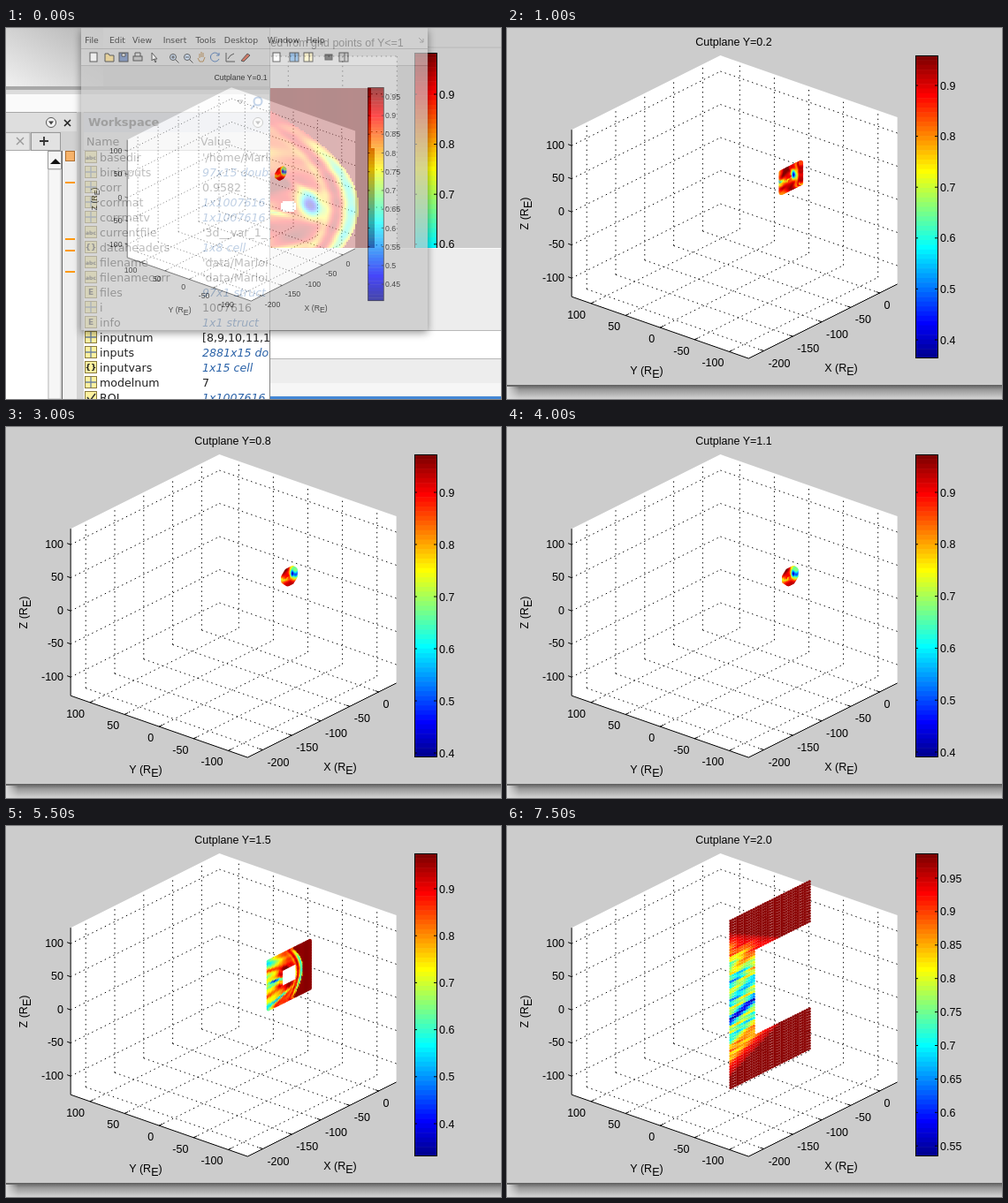
Animation of 560x420 px, one loop 8 s. Source, as an HTML page with a canvas:

```html
<!DOCTYPE html>
<html lang="en">
<head>
<meta charset="utf-8">
<title>Cutplane slices</title>
<style>
html, body { margin: 0; width: 100%; height: 100%; overflow: hidden; background: #ccc; }
#stage { position: absolute; left: 0; top: 0; width: 560px; height: 420px; overflow: hidden; }
#stage > * { position: absolute; left: 0; top: 0; }
text { font: 12.5px "Liberation Sans", Arial, sans-serif; fill: #000; white-space: pre; }
.ui text { font: 12.6px "DejaVu Sans", sans-serif; fill: #222; }
.ui .small { font-size: 9.3px; }
.ui .head { font-size: 13px; font-weight: bold; fill: #444; }
.ui .blue { fill: #2a62a8; font-style: italic; }
.dots { stroke: #000; stroke-width: 1; stroke-dasharray: 1.4 4; fill: none; }
.axis { stroke: #000; stroke-width: 1; fill: none; }
</style>
</head>
<body>
<div id="stage">
  <svg id="back" width="560" height="420"></svg>
  <canvas id="heat" width="560" height="420"></canvas>
  <svg id="front" width="560" height="420"></svg>
</div>
<script>
const LOOP = 8000;
const $ = id => document.getElementById(id);
const clamp = (v, a = 0, b = 1) => Math.min(b, Math.max(a, v));

const jetRgb = v => [3, 2, 1].map(k => Math.round(255 * clamp(1.5 - Math.abs(4 * v - k))));
const jet = v => `rgb(${jetRgb(clamp(v, 0.02, 1))})`;

// --- SVG helpers ---
const rect = (x, y, w, h, fill, more = "") =>
  `<rect x="${x}" y="${y}" width="${w}" height="${h}" fill="${fill}" ${more}/>`;
const line = (p, q, cls = "axis", more = "") =>
  `<line x1="${p[0]}" y1="${p[1]}" x2="${q[0]}" y2="${q[1]}" class="${cls}" ${more}/>`;
const path = (d, stroke, more = "") => `<path d="${d}" stroke="${stroke}" fill="none" ${more}/>`;
const label = (x, y, s, anchor = "start", more = "") =>
  `<text x="${x}" y="${y}" text-anchor="${anchor}" ${more}>${s}</text>`;
const axisName = c => `${c} (R<tspan dy="4">E</tspan><tspan dy="-4">)</tspan>`;
const range = (n, f) => Array.from({ length: n }, (_, i) => f(i)).join("");

// --- correlation field, in pixels of the flat plot ---
// centre x, centre y, length, width, slope, strength
const streaks = [
  [208, 132, 72, 11, 0.1, -0.3], [235, 159, 95, 6, 0.16, 0.2],
  [165, 183, 62, 7, -0.2, -0.2], [290, 181, 30, 11, -0.25, 0.24],
  [252, 199, 32, 4, 0.03, -0.66], [343, 199, 13, 13, 0.3, -0.85],
  [228, 210, 40, 4, 0, -0.25], [275, 222, 30, 6, 0.1, 0.2],
  [205, 238, 75, 7, -0.12, 0.18], [280, 258, 50, 4.5, -0.22, -0.5],
  [185, 271, 55, 8, -0.1, -0.27], [235, 284, 75, 6, -0.32, 0.16],
  [160, 294, 55, 13, -0.15, -0.3], [322, 236, 28, 9, -0.25, 0.16],
  [303, 208, 18, 3, 0.2, -0.3], [310, 200, 40, 34, 0, 0.14],
  [330, 178, 14, 5, 0.6, -0.18], [175, 325, 60, 7, 0.05, 0.12]
];

function field(x, y) {
  const dy = y - 202, depth = 398 - dy * dy / 119 - x;
  if (depth < 0) return 0.988 + 0.005 * Math.sin(x / 8);
  let v = 0.92 - 0.11 * clamp(depth / 35) - 0.18 * clamp((depth - 55) / 85);
  v -= 0.5 * Math.exp(-(((depth - 8) / 9) ** 2) - (dy / 74) ** 4);
  v += 0.1 * Math.exp(-(((depth - 24) / 6) ** 2) - (dy / 95) ** 4);
  v -= 0.12 * Math.exp(-(((depth - 36) / 5) ** 2) - (dy / 70) ** 4);
  for (const [cx, cy, sx, sy, slope, amp] of streaks) {
    const u = (x - cx) / sx, w = (y - cy - slope * (x - cx)) / sy;
    v += amp * Math.exp(-u * u - w * w);
  }
  return v + 0.018 * Math.sin(y / 4 + x / 40) + 0.012 * Math.sin(y / 2.3 - x / 25);
}

function paintHeat() {
  const g = $("heat").getContext("2d");
  for (let y = 68; y < 337; y += 2)
    for (let x = 125; x < (Math.abs(y - 202) < 67 ? 416 : 413); x += 2) {
      g.fillStyle = jet(field(x, y));
      g.fillRect(x, y, 2, Math.min(2, 337 - y));
    }
  g.fillStyle = "#fff";
  g.fillRect(313, 196, 13, 12);
  g.fillRect(311, 198, 17, 8);
}

// --- colour bar: ticks start at value v0 at height y0 ---
function colorBar(top, v0, y0, gap, step, n) {
  return range(64, i => rect(462, (top + i * 343 / 64).toFixed(2), 25.5, i < 63 ? 5.9 : 5.3, jet(1 - i / 64))) +
    rect(462.5, top + 0.5, 25, 342, "none", 'stroke="#000"') +
    range(n, i => {
      const y = y0 + i * gap;
      return line([484, y], [487.5, y]) + line([462, y], [465, y]) +
        label(490, y + 4.5, +(v0 - i * step).toFixed(2));
    });
}

const windowEdge =
  `<defs><linearGradient id="shade" x2="0" y2="1"><stop offset="0" stop-color="#5c5c5c"/>
   <stop offset=".35" stop-color="#999"/><stop offset="1" stop-color="#d4d4d4"/></linearGradient>
   <linearGradient id="corner"><stop offset="0" stop-color="#ddd"/>
   <stop offset="1" stop-color="#ddd" stop-opacity="0"/></linearGradient></defs>` +
  rect(0, 404, 560, 16, "url(#shade)") + rect(0, 406, 14, 14, "url(#corner)");

// --- flat plot ---
function flatPlot() {
  const ticks = [-80, -60, -40, -20, 0, 20, 40, 60, 80];
  const px = v => 319.3 + v * 3.075, py = v => 203 - v * 2.1375;
  return rect(0, 0, 560, 420, "#ccc") + rect(73, 32, 369.5, 342, "#fff") +
    ticks.map(v => {
      const x = px(v), y = py(v);
      return line([73, y], [442, y], "dots") + line([73, y], [77, y]) +
        label(69, y + 4.5, v, "end") + (v > 40 ? "" :
        line([x, 32], [x, 374], "dots") + line([x, 374], [x, 370]) + label(x, 391, v, "middle"));
    }).join("") +
    path("M73.5 32V374H442", "#000") +
    label(256, 21, "Correlations on the Y=0 cutplane interpolated from grid points of Y&lt;=1", "middle") +
    label(258, 405, axisName("X"), "middle") +
    label(0, 0, axisName("Z"), "middle", 'transform="translate(36 204) rotate(-90)" style="font-size:13.5px"') +
    colorBar(28, 0.9, 75, 56.6, 0.1, 6);
}

// --- 3D box ---
const project = (X, Y, Z) => [321.5 + 0.656 * X - 0.782 * Y, 169 - 0.328 * X - 0.273 * Y - 0.75 * Z];
const LO = { X: -226, Y: -128, Z: -128 }, HI = { X: 30.5, Y: 128, Z: 124 };

function box() {
  const P = project;
  const near = LO.X, far = HI.X, left = HI.Y, right = LO.Y, floor = LO.Z, roof = HI.Z;
  const hull = [P(near, left, roof), P(far, left, roof), P(far, right, roof),
    P(far, right, floor), P(near, right, floor), P(near, left, floor)];
  let s = `<polygon points="${hull.join(" ")}" fill="#fff"/>`;
  for (const X of [-200, -150, -100, -50, 0]) {
    const e = P(X, right, floor);
    s += line(P(X, left, floor), P(X, left, roof), "dots") + line(e, P(X, left, floor), "dots") +
      line(e, P(X, right + 5, floor)) + label(e[0] + 5, e[1] + 18, X);
  }
  for (const Y of [100, 50, 0, -50, -100]) {
    const e = P(near, Y, floor);
    s += line(P(far, Y, floor), P(far, Y, roof), "dots") + line(e, P(far, Y, floor), "dots") +
      line(e, P(near + 6, Y, floor)) + label(e[0] - 6, e[1] + 17, Y, "end");
  }
  for (const Z of [100, 50, 0, -50, -100]) {
    const e = P(near, left, Z), c = P(far, left, Z);
    s += line(e, c, "dots") + line(c, P(far, right, Z), "dots") +
      line(e, [e[0] - 4, e[1] - 1.5]) + label(65, e[1] + 3.5, Z, "end");
  }
  s += path("M" + [hull[0], hull[5], hull[4], hull[3]].join("L"), "#000");
  return s + label(378, 389, axisName("X"), "middle") + label(158, 392, axisName("Y"), "middle") +
    label(0, 0, axisName("Z"), "middle", 'transform="translate(24 210) rotate(-90)"');
}

// --- dotted slices ---
const inner = (X, Z) => field(319 + X * 3.07, 202 - Z * 2.1375);
function tail(X, Z) {
  const gap = 108 - 0.5 * (X + 105) - Math.abs(Z);
  if (gap < 0) return 0.99;
  const calm = clamp(gap / 55);
  return Math.max(0.45, 0.95 - gap * 0.008) +
    calm * (0.14 * Math.sin(Z * 0.22 - X * 0.1) + 0.08 * Math.sin(Z * 0.7)) -
    0.25 * Math.exp(-(((Z + 18 - (X + 85) * 0.3) / 6) ** 2));
}
const slices = {
  ball: { x: 11, z: 11, step: 1.5, r: 2.4, value: inner,
    has: (X, Z) => {
      const a = Math.abs(X), b = Math.abs(Z);
      return Math.max(a, b, (a + b) / 1.4) < 11.2 && Math.hypot(X, Z) > 3;
    } },
  plate: { x: 17, z: 16, step: 1.7, r: 2.6, value: inner,
    has: (X, Z) => Math.hypot(X, Z) > 4.5 },
  frame: { x: 36, z: 36, step: 2, r: 2, value: inner,
    has: (X, Z) => Math.max(Math.abs(X), Math.abs(Z)) > 12 },
  shell: { x0: -102, x: 36, z: 126, step: 4, r: 1.65, value: tail,
    has: (X, Z) => X < -60 || Math.abs(Z) > 62 }
};

function slice(kind, Y) {
  const { x, x0 = -x, z, step, r, value, has } = slices[kind];
  let s = "";
  for (let X = x0; X <= x + 0.01; X += step)
    for (let Z = -z; Z <= z + 0.01; Z += step) {
      if (!has(X, Z)) continue;
      const [cx, cy] = project(X, Y, Z);
      s += `<circle cx="${cx.toFixed(1)}" cy="${cy.toFixed(1)}" r="${r}" fill="${jet(value(X, Z))}"/>`;
    }
  return s;
}

const cutplane = ([, Y, kind, ...bar]) =>
  box() + slice(kind, Y) + label(256.5, 20, `Cutplane Y=${Y.toFixed(1)}`, "middle") + colorBar(31, ...bar);

// --- desktop behind the first figure ---
const vars = `basedir|'/home/Marlo
bininputs|97x15 double
corr|0.9582
corrmat|1x1007616
corrmatv|1x1007616
currentfile|'3d__var_1_
dataheaders|1x8 cell
filename|'data/Marloi
filenamecorr|'data/Marloi
files|97x1 struct
i|1007616
info|1x1 struct
inputnum|[8,9,10,11,1
inputs|2881x15 double
inputvars|1x15 cell
modelnum|7
ROI|1x1007616`.split("\n").map(r => r.split("|"));

function varIcon(name, value, y) {
  const mark = /cell/.test(value) ? "{}" : /^'/.test(value) ? "abc" : /struct/.test(value) ? "E" : "";
  return rect(89.5, y - 6.5, 13, 13, "#fdf2a0", 'stroke="#8a7a3c"') +
    (name === "ROI" ? path(`M92 ${y}l3 4l6 -8`, "#333", 'stroke-width="1.5"') :
     mark ? label(96, y + 3, mark, "middle", `style="font-size:${mark === "abc" ? 6 : 9}px;font-weight:bold"`) :
     path(`M96 ${y - 6}v12M90 ${y}h12`, "#6a80a0", 'stroke-width="1.3"'));
}

const dropIcon = (x, y) =>
  `<circle cx="${x}" cy="${y}" r="5.5" fill="#f4f4f4" stroke="#555"/><path d="M${x - 3} ${y - 1.5}h6l-3 4z" fill="#444"/>`;

function desktop() {
  const left = `<defs><linearGradient id="bar" x1="0" y1="1" x2="1" y2="0"><stop offset="0" stop-color="#f0f0f0"/>
    <stop offset="1" stop-color="#b4b4b4"/></linearGradient></defs>` +
    rect(0, 0, 299, 420, "#dedede") + rect(0, 0, 110, 66, "url(#bar)") + rect(110, 0, 189, 66, "#c4c4c4") +
    rect(0, 66, 299, 4, "#a8a8a8") + rect(0, 70, 299, 5, "#dcdcdc") +
    rect(0, 75, 299, 20, "#fafafa") + path("M0 95.5H299", "#a8a8a8") +
    dropIcon(51, 107) + path("M66 104l7 7m0 -7l-7 7", "#222", 'stroke-width="1.6"') +
    rect(0, 117, 80, 22, "#d2d2d2") + rect(-1, 118.5, 28, 20, "#e4e4e4", 'stroke="#aaa"') +
    path("M12 124l8 8m0 -8l-8 8", "#999", 'stroke-width="1.4"') +
    rect(28.5, 118.5, 33, 20, "#e2e2e2", 'stroke="#999"') +
    path("M38 128h10M43 123v10", "#333", 'stroke-width="1.8"') +
    rect(0, 139, 47, 281, "#fff") + rect(47, 139, 16, 281, "#ececec") +
    rect(47.5, 139.5, 15, 20, "#f4f4f4", 'stroke="#999"') + `<path d="M50 154h12l-6 -6z" fill="#111"/>` +
    rect(48, 160, 14, 260, "#f6f6f6", 'stroke="#bbb"') + path("M63.5 139V420", "#666") +
    rect(64, 139, 16, 281, "#efefef") + rect(67.5, 139.5, 10, 11, "#f7b36a", 'stroke="#b07030"') +
    [174, 238, 251, 275].map(y => rect(67, y, 11, 2, "#ff9a10")).join("") +
    rect(80, 95, 8, 325, "#d4d4d4");
  const panel = path("M262 82h6l-3 4z", "#333") +
    `<circle cx="285" cy="83" r="4.5" fill="none" stroke="#3a6fb5" stroke-width="2"/>` +
    path("M281 87l-4 5", "#3a6fb5", 'stroke-width="2"') +
    rect(88, 96, 211, 22, "#d4d9e2") + label(93, 111, "Workspace", "start", 'class="head"') + dropIcon(285, 107) +
    rect(88, 118, 211, 20, "#e8e8e8") + label(91, 133, "Name") + label(220, 133, "Value") +
    path("M88 138.5H299", "#aaa") + rect(88, 139, 211, 281, "#fff") +
    vars.map(([name, value], i) => {
      const y = 146 + i * 17;
      return varIcon(name, value, y) + label(106, y + 4.5, name) +
        label(222, y + 4.5, value, "start", /^\d+x/.test(value) ? 'class="blue"' : "");
    }).join("");
  const lower = rect(299, 249, 261, 171, "#ededed") + path("M299 249.5H560", "#fafafa") +
    rect(299, 343, 261, 31, "#fff") + path("M299 342.5H560M299 374.5H560", "#b8b8b8") +
    rect(299, 402, 261, 14, "#f6f6f6") + rect(299, 417, 261, 3, "#4387d6") + path("M298.5 0V420", "#888");
  return `<g class="ui"><svg width="298" height="420">${left}${panel}</svg>${lower}` +
    path("M467 11l5 5m0 -4v4h-4", "#333") + path("M477 21.5Q480 22 484 22H560", "#b8b8b8") + "</g>";
}

function figureWindow() {
  const menu = { File: 97, Edit: 126, View: 154, Insert: 191, Tools: 226, Desktop: 266, Window: 314, Help: 350 };
  const icon = (x, body) => `<g transform="translate(${x} 33)" fill="none" stroke="#333">${body}</g>`;
  const zoom = sign => `<circle r="3.5" fill="#cfe4ff"/><path d="M2.5 2.5l4 4M-2 0h4${sign}"/>`;
  const page = '<rect x="-4" y="-5" width="8" height="10" fill="#fff"/>';
  const disk = '<rect x="-5" y="-5" width="10" height="10" fill="#6d86b8"/><path d="M-2 -4h4v3h-4z" fill="#fff"/>';
  const tile = c => `<rect x="-5" y="-5" width="10" height="10" fill="${c}"/><path d="M1 -5v10"/>`;
  return `<g class="ui">${rect(85, 0, 392, 342, "#c6c6c6", 'style="filter:drop-shadow(0 3px 5px #0009)"')}` +
    rect(85, 0, 392, 42, "#d2d2d2") +
    Object.entries(menu).map(([s, x]) => label(x, 17, s, "middle", 'class="small"')).join("") +
    path("M85 23.5H477M85 42.5H477", "#aaa") +
    icon(99, page) + icon(117, '<path d="M-5 5v-9h4l1 2h5v7z" fill="#f3d78c"/>') + icon(133, disk) +
    icon(149, '<rect x="-5" y="-1" width="10" height="5" fill="#bbb"/><path d="M-3 -1v-4h6v4"/>') +
    icon(168, '<path d="M-3 -5v9l2 -2l2 4l1 -1l-2 -3h3z" fill="#fff"/>') +
    icon(189, zoom("M0 -2v4")) + icon(205, zoom("")) +
    icon(221, '<path d="M-4 1l2 4h4l2 -5M-2 1v-5M0 0v-6M2 0v-5" stroke="#a67638"/>') +
    icon(237, '<path d="M4 -2a5 5 0 1 0 0 4M4 -5v3h-3" stroke="#3867a8"/>') +
    icon(254, '<path d="M-5 5v-10M-5 5h10M-3 2l3 -4l4 -2"/>') +
    icon(271, '<path d="M-5 4l7 -8l3 2l-7 7z" fill="#d05a40"/>') +
    icon(306, page) + icon(326, tile("#7baee0")) + icon(342, tile("#fff4c4")) +
    icon(365, '<rect x="-4" y="-3" width="8" height="6" fill="#555"/>') + icon(382, tile("#bbb")) + "</g>";
}

// --- timeline: start, plane, shape, first tick value, its height, gap, step, count ---
const scenes = [
  [0, 0.1, "ball", 0.95, 46, 30.1, 0.05, 11],
  [500],
  [1000, 0.2, "plate", 0.9, 65, 57.6, 0.1, 6],
  [1500, 0.4, "ball", 0.95, 46, 30.1, 0.05, 11],
  [2000, 0.6, "ball", 0.9, 74, 58, 0.1, 6],
  [3000, 0.8, "ball", 0.9, 74, 59, 0.1, 6],
  [4000, 1.1, "ball", 0.9, 74, 58.8, 0.1, 6],
  [5000, 1.3, "plate", 0.9, 66, 57.2, 0.1, 6],
  [5500, 1.5, "frame", 0.9, 71, 53.2, 0.1, 6],
  [6500, 1.6, "frame", 0.9, 71, 53.8, 0.1, 6],
  [7000, 1.8, "frame", 0.9, 70, 53.6, 0.1, 6],
  [7500, 2, "shell", 0.95, 59, 37.9, 0.05, 9]
];

let shown = -1;
function show(i) {
  const first = i === 0, flat = i === 1;
  $("back").innerHTML = first ? flatPlot() + desktop() : flat ? flatPlot() + windowEdge : "";
  $("heat").style.display = first || flat ? "block" : "none";
  $("heat").style.clipPath = first ? "inset(0 0 171px 299px)" : "none";
  $("front").style.opacity = first ? 0.7 : 1;
  $("front").innerHTML = flat ? "" : first
    ? figureWindow() + `<g transform="translate(86 45.4) scale(.7 .705)">${cutplane(scenes[0])}</g>`
    : rect(0, 0, 560, 420, "#ccc") + cutplane(scenes[i]) + windowEdge;
}

function draw(now) {
  const t = now % LOOP;
  const i = scenes.findLastIndex(s => s[0] <= t);
  if (i !== shown) show(shown = i);
}

function tick() {
  draw(performance.now());
  requestAnimationFrame(tick);
}

paintHeat();
tick();
</script>
</body>
</html>
```
